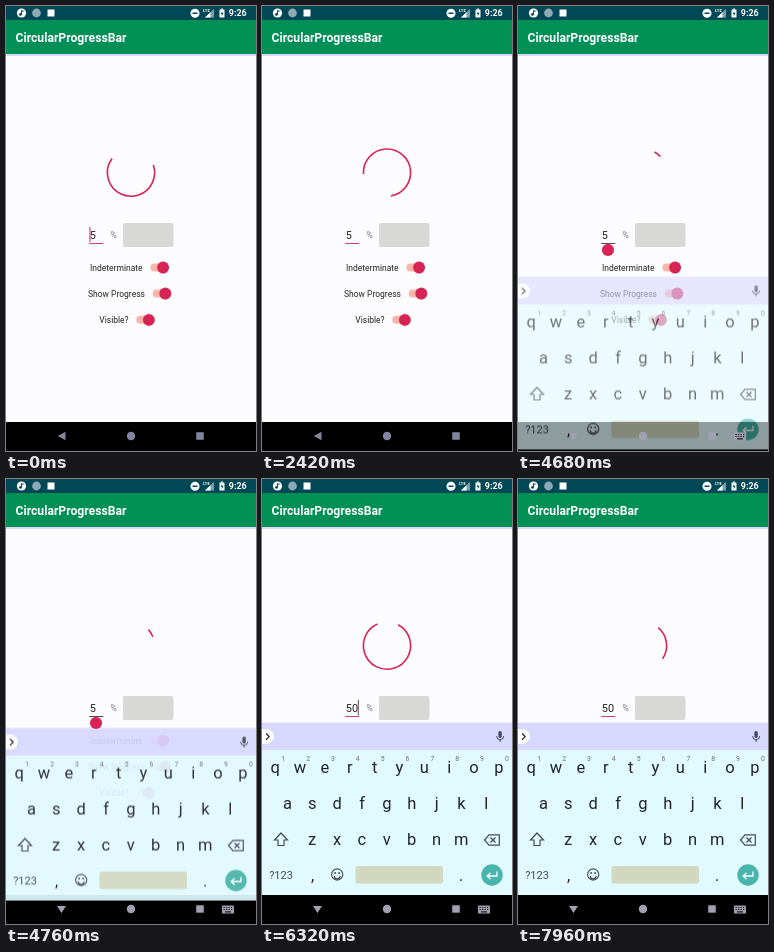
These frames come from a looping animation (250x445 px, 8 s). An HTML page with a canvas:

```html
<!DOCTYPE html>
<html lang="en">
<head>
<meta charset="utf-8">
<title>CircularProgressBar</title>
<style>
html, body { margin: 0; width: 100%; height: 100%; overflow: hidden; background: #000; }
canvas { display: block; width: 250px; height: 445px; }
</style>
</head>
<body>
<canvas id="stage"></canvas>
<script>
const W = 250, H = 445, LOOP = 8000;
const TAP = 4160, KEYBOARD = 4600, TYPED = 6070;
const PINK = '#d82455', INK = '#242428', STATUS = '#004855';
const scale = window.devicePixelRatio || 1;

function prepare(canvas) {
  canvas.width = W * scale;
  canvas.height = H * scale;
  const c = canvas.getContext('2d');
  c.scale(scale, scale);
  return c;
}

function rect(c, x, y, w, h, color, r = 0) {
  c.fillStyle = color;
  c.beginPath();
  c.roundRect(x, y, w, h, r);
  c.fill();
}

function disc(c, x, y, r, color) {
  c.fillStyle = color;
  c.beginPath();
  c.arc(x, y, r, 0, Math.PI * 2);
  c.fill();
}

function poly(c, points, color, width, closed = true) {
  c.beginPath();
  points.forEach(([x, y]) => c.lineTo(x, y));
  if (closed) c.closePath();
  if (width) {
    c.strokeStyle = color;
    c.lineWidth = width;
    c.stroke();
  } else {
    c.fillStyle = color;
    c.fill();
  }
}

function text(c, s, x, y, size, color, weight = 400, align = 'left') {
  c.font = `${weight} ${size}px Roboto, sans-serif`;
  c.textAlign = align;
  c.fillStyle = color;
  c.fillText(s, x, y);
}

function statusBar(c) {
  rect(c, 0, 0, W, 14, STATUS);
  disc(c, 15.5, 7, 4.6, '#fff');
  disc(c, 14.5, 8.4, 1.3, STATUS);
  rect(c, 15.1, 4.4, 0.9, 4, STATUS);
  rect(c, 15.1, 4.4, 2.4, 1.2, STATUS);
  disc(c, 30.5, 7, 4.4, '#90a8b4');
  rect(c, 41.5, 3.5, 7, 7, '#fff');
  disc(c, 189, 7.2, 4.5, '#fff');
  rect(c, 186.5, 6.5, 5, 1.5, STATUS);
  text(c, 'LTE', 197, 6.4, 4.2, '#fff', 700);
  poly(c, [[199, 11.5], [208, 11.5], [208, 2.8]], '#7d9fa6');
  poly(c, [[199, 11.5], [204.5, 11.5], [204.5, 6.2]], '#fff');
  rect(c, 213.5, 3.4, 5, 8.2, '#fff', 0.6);
  rect(c, 215, 2.5, 2, 1, '#fff');
  poly(c, [[216.6, 4.8], [214.7, 8], [216, 8], [215.6, 10.4], [217.5, 7], [216.2, 7]], STATUS);
  text(c, '9:26', 240.6, 10.4, 8.9, '#fff', 700, 'right');
}

function toggle(c, label, x, y, trackX) {
  text(c, label, x, y + 3.2, 8.5, INK);
  rect(c, trackX, y - 4, 17, 8, '#fcb4aa', 4);
  disc(c, trackX + 12.6, y + 0.5, 6.2, 'rgba(0,0,0,.13)');
  disc(c, trackX + 12.6, y, 5.9, PINK);
}

function screen(c) {
  rect(c, 0, 0, W, H, '#fcfcff');
  statusBar(c);
  rect(c, 0, 14, W, 34, '#009055');
  rect(c, 0, 48, W, 2, '#d8d8ff');
  text(c, 'CircularProgressBar', 9.5, 36.4, 12.16, '#fff', 700);
  text(c, '%', 104.5, 232.2, 8.5, '#77777b');
  rect(c, 117, 217, 50.5, 24, '#d8d8d6', 2);
  toggle(c, 'Indeterminate', 84, 261.5, 144.5);
  toggle(c, 'Show Progress', 82, 287.5, 146.7);
  toggle(c, 'Visible?', 93.3, 313.8, 130.3);
  rect(c, 0, 416, W, 29, '#000');
}

function keyRow(c, letters, x, y, numbered) {
  [...letters].forEach((ch, i) => {
    const kx = x + i * 24.85;
    text(c, ch, kx, y + 5.7, 16.5, INK, 400, 'center');
    if (numbered) text(c, String((i + 1) % 10), kx + 8, y - 6, 6.8, '#6c6c78', 400, 'center');
  });
}

function keyboard(c) {
  const icon = '#484855';
  rect(c, 0, 271, W, 145, '#e0faff');
  rect(c, 0, 243.5, W, 27.5, '#d8d8ff');
  rect(c, -6, 250, 18, 15, '#fff', 7.5);
  poly(c, [[4, 254.5], [7.2, 257.6], [4, 260.7]], '#242428', 1.2, false);

  rect(c, 236.4, 252, 3.4, 7, icon, 1.7);
  c.strokeStyle = icon;
  c.lineWidth = 1;
  c.beginPath();
  c.arc(238.1, 257.2, 3.5, 0, Math.PI);
  c.moveTo(238.1, 260.7);
  c.lineTo(238.1, 263);
  c.stroke();

  keyRow(c, 'qwertyuiop', 13.2, 288, true);
  keyRow(c, 'asdfghjkl', 25.5, 324);
  keyRow(c, 'zxcvbnm', 50.2, 360);

  poly(c, [[19, 354], [25.5, 361], [22, 361], [22, 366.5], [16, 366.5], [16, 361], [12.5, 361]], icon, 1.2);
  poly(c, [[222.5, 361], [227, 355.8], [237.3, 355.8], [237.3, 366.2], [227, 366.2]], icon, 1.2);
  poly(c, [[228.5, 358.5], [233.5, 363.5]], icon, 1.2, false);
  poly(c, [[233.5, 358.5], [228.5, 363.5]], icon, 1.2, false);

  text(c, '?123', 19, 399.5, 11, icon, 400, 'center');
  text(c, ',', 50.5, 402, 16, INK, 400, 'center');
  text(c, '.', 199, 402, 16, INK, 400, 'center');
  c.strokeStyle = icon;
  c.lineWidth = 1.1;
  c.beginPath();
  c.arc(75.2, 395.5, 5.6, 0, Math.PI * 2);
  c.moveTo(78.2, 396.7);
  c.arc(75.2, 396.7, 3, 0, Math.PI);
  c.stroke();
  disc(c, 73.2, 394, 0.9, icon);
  disc(c, 77.2, 394, 0.9, icon);
  rect(c, 93.5, 387, 87.5, 17.5, '#d2d8c0', 2);

  disc(c, 230, 396, 10.7, '#48b4aa');
  poly(c, [[235, 392.5], [235, 397], [225.5, 397]], '#fff', 1.3, false);
  poly(c, [[228.5, 393.8], [225.2, 397], [228.5, 400.2]], '#fff', 1.3, false);
}

function navIcons(c, open) {
  const color = open ? '#a0a0b0' : '#8484a0';
  if (open) {
    poly(c, [[51, 427], [60, 427], [55.5, 434]], color);
    rect(c, 216, 426.5, 12, 8, color, 1);
    for (let i = 0; i < 8; i++) rect(c, 217.5 + (i % 4) * 2.5, 428 + (i >> 2) * 2, 1.2, 1, '#000');
    rect(c, 219, 432.4, 6, 1, '#000');
  } else {
    poly(c, [[59.5, 425.7], [59.5, 434.3], [51.8, 430]], color);
  }
  disc(c, 125, 430, 4.2, color);
  rect(c, 190.2, 426.2, 7.6, 7.6, color, 0.5);
}

// Linear interpolation through [time, value] pairs.
function track(keys, t) {
  let i = 1;
  while (i < keys.length - 1 && t > keys[i][0]) i++;
  const [t0, a] = keys[i - 1], [t1, b] = keys[i];
  return a + (b - a) * (t - t0) / (t1 - t0);
}

// Degrees clockwise from the top, and the phase of the sweep's swing.
const TAIL = [[0, 71], [1230, 356], [3610, 896], [4680, 1109], [5300, 1250], [6320, 1468], [7960, 1840]];
const SWING = [[0, 240], [1230, 378], [3610, 610], [4680, 722], [5300, 787], [6320, 900], [7960, 1023]];
const rad = deg => deg * Math.PI / 180;

function spinner(c, t) {
  const start = track(TAIL, t) - 90;
  const sweep = 163 - 145 * Math.cos(rad(track(SWING, t)));
  c.strokeStyle = PINK;
  c.lineWidth = 1.6;
  c.beginPath();
  c.arc(125, 166.6, 23.6, rad(start), rad(start + sweep));
  c.stroke();
}

function field(c, t) {
  const typed = t >= TYPED, tapped = t >= TAP && !typed;
  text(c, typed ? '50' : '5', 83.8, 233.2, 10.9, INK);
  rect(c, 83.3, 237, 14, 1, tapped ? '#484855' : '#c2408c');

  const since = typed ? t - TYPED : tapped ? t - TAP : t + 130;
  if (since % 1000 < 500) {
    const x = typed ? 95.8 : tapped ? 89.6 : 83.4;
    rect(c, x, 221, 1.1, 15, t < TAP ? '#c2406c' : '#6b5a62');
  }
}

function handle(c) {
  disc(c, 90, 244, 6.1, PINK);
  poly(c, [[90, 237.5], [94.4, 240.6], [85.6, 240.6]], PINK);
}

const stage = document.getElementById('stage');
const ctx = prepare(stage);
const base = document.createElement('canvas');
const keys = document.createElement('canvas');

function draw(t) {
  ctx.drawImage(base, 0, 0, W, H);
  spinner(ctx, t);
  field(ctx, t);
  const p = Math.min(1, Math.max(0, (t - KEYBOARD) / 250));
  if (p > 0) {
    const ease = 1 - (1 - p) ** 2.5;
    ctx.globalAlpha = ease;
    ctx.drawImage(keys, 0, 73 * (1 - ease), W, H);
    ctx.globalAlpha = 1;
  }
  if (t >= TAP && t < TYPED) handle(ctx);
  navIcons(ctx, p > 0);
}

function frame() {
  draw(performance.now() % LOOP);
  requestAnimationFrame(frame);
}

screen(prepare(base));
keyboard(prepare(keys));
frame();
</script>
</body>
</html>
```
